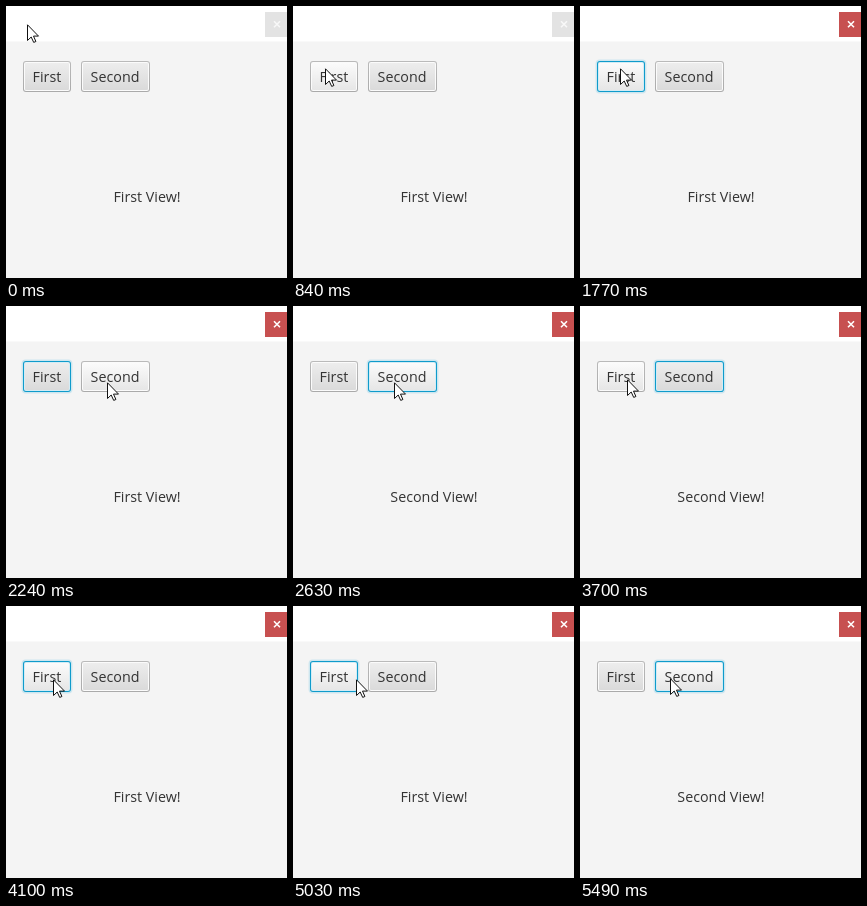
Recreate the animation shown at these times as an HTML page. Size 281 px wide and 272 px high, loop 6420 ms.

```html
<!DOCTYPE html>
<html lang="en">
<head>
<meta charset="utf-8">
<title>View switcher</title>
<style>
  html, body { margin: 0; width: 100%; height: 100%; overflow: hidden; background: #f4f4f4; }
  svg { display: block; width: 100%; height: 100%; }
  text { font: 14.3px "Open Sans", "Noto Sans", sans-serif; fill: #333; }
  .view { text-anchor: middle; }
  .close rect { fill: #e3e3e3; }
  .close path { stroke: #f8f8f8; stroke-width: 1.6; }
  .active .close rect { fill: #c75050; }
  .active .close path { stroke: #fff; }
  .edge { fill: url(#edge); }
  .rim { fill: #fbfbfb; }
  .glow { fill: #039ed3; fill-opacity: .16; visibility: hidden; }
  .body { fill: url(#normal); }
  .hover .body { fill: url(#hover); }
  .pressed .body { fill: url(#pressed); }
  .pressed .rim { fill: #e4e4e4; }
  .focused .edge { fill: #0f9bcb; }
  .focused .glow { visibility: visible; }
</style>
</head>
<body>
<svg viewBox="0 0 281 272" id="stage">
  <defs>
    <linearGradient id="edge" x2="0" y2="1"><stop stop-color="#bababa"/><stop offset="1" stop-color="#aaa"/></linearGradient>
    <linearGradient id="normal" x2="0" y2="1"><stop stop-color="#ededed"/><stop offset="1" stop-color="#dadada"/></linearGradient>
    <linearGradient id="hover" x2="0" y2="1"><stop stop-color="#fbfbfb"/><stop offset="1" stop-color="#e6e6e6"/></linearGradient>
    <linearGradient id="pressed" x2="0" y2="1"><stop stop-color="#dedede"/><stop offset="1" stop-color="#cdcdcd"/></linearGradient>
  </defs>
  <rect width="281" height="272" fill="#f4f4f4"/>
  <rect width="281" height="35.5" fill="#fff"/>
  <g class="close">
    <rect x="259" y="6" width="22" height="25"/>
    <path d="M268 15.2l6 6m0-6l-6 6"/>
  </g>
  <g id="buttons"></g>
  <text class="view" id="view" x="141" y="196"></text>
  <path id="cursor" d="M.5.8V16.5L4.2 13l2.5 5.4 2.2-.9L6.5 12.1h5z" fill="#fff" stroke="#111" stroke-linejoin="round"/>
</svg>
<script>
const LOOP = 6420;
const stage = document.getElementById('stage');
const view = document.getElementById('view');
const cursor = document.getElementById('cursor');

const TOP = 55, HEIGHT = 31;
const buttons = [
  { label: 'First', x: 17, width: 48 },
  { label: 'Second', x: 75, width: 69 }
];

// press and release times, and the index of the button clicked
const clicks = [
  { down: 990, up: 1070, target: 0 },
  { down: 2550, up: 2630, target: 1 },
  { down: 3930, up: 4100, target: 0 },
  { down: 5340, up: 5490, target: 1 }
];

const ease = p => (1 - Math.cos(Math.PI * p)) / 2;
const linear = p => p;

// the pointer travels in discrete steps, one every gap ms
const moves = [
  { start: 450, gap: 78, steps: 6, to: [32, 62], curve: ease },
  { start: 1770, gap: 80, steps: 1, to: [40, 62], curve: linear },
  { start: 1850, gap: 78, steps: 6, to: [101, 76], curve: ease },
  { start: 3330, gap: 74, steps: 6, to: [47, 73], curve: ease },
  { start: 5030, gap: 80, steps: 1, to: [63, 73], curve: linear },
  { start: 5110, gap: 75, steps: 3, to: [90, 72], curve: linear }
];

function layer(button, name, inset, radius) {
  return `<rect class="${name}" x="${button.x + inset}" y="${TOP + inset}" rx="${radius}"
    width="${button.width - 2 * inset}" height="${HEIGHT - 2 * inset}"/>`;
}

document.getElementById('buttons').innerHTML = buttons.map(b => `<g>
  ${layer(b, 'glow', -1.4, 4)}${layer(b, 'edge', 0, 3)}
  ${layer(b, 'rim', 1, 2)}${layer(b, 'glow', 1, 2)}${layer(b, 'body', 2, 1)}
  <text x="${b.x + 9.6}" y="76">${b.label}</text></g>`).join('');
const groups = document.querySelectorAll('#buttons > g');

function pointerAt(t) {
  let pos = [21, 18];
  for (const { start, gap, steps, to, curve } of moves) {
    if (t < start) break;
    const step = Math.min(steps, Math.floor((t - start) / gap) + 1);
    const p = curve(step / steps);
    pos = pos.map((v, i) => Math.round(v + (to[i] - v) * p));
  }
  return pos;
}

function draw(t) {
  const [x, y] = pointerAt(t);
  const pressed = clicks.find(c => t >= c.down && t < c.up)?.target;
  const focused = clicks.filter(c => t >= c.down).pop()?.target;
  const shown = clicks.filter(c => t >= c.up).pop()?.target ?? 0;

  cursor.setAttribute('transform', `translate(${x} ${y})`);
  view.textContent = `${buttons[shown].label} View!`;
  stage.classList.toggle('active', focused !== undefined);
  buttons.forEach((b, i) => {
    const inside = x >= b.x && x < b.x + b.width && y >= TOP && y < TOP + HEIGHT;
    groups[i].classList.toggle('hover', inside);
    groups[i].classList.toggle('pressed', i === pressed);
    groups[i].classList.toggle('focused', i === focused);
  });
}

const begin = performance.now();
function tick() {
  draw((performance.now() - begin) % LOOP);
  requestAnimationFrame(tick);
}
tick();
</script>
</body>
</html>
```
